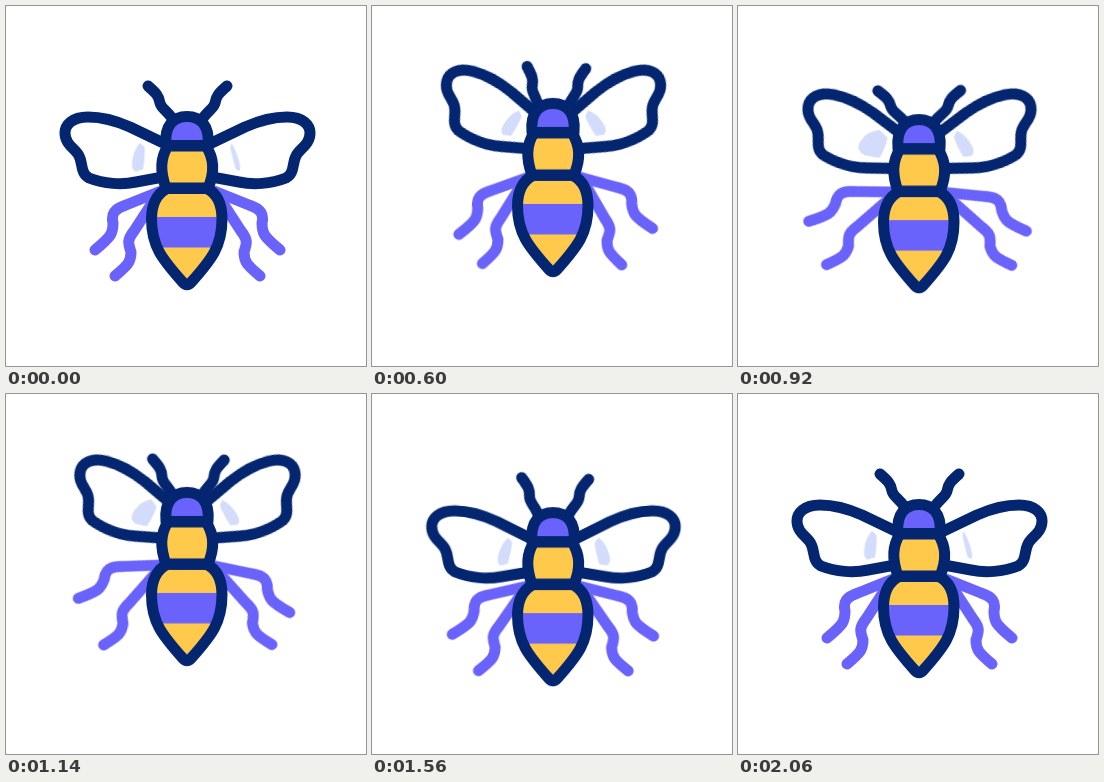
Write an HTML page that moves like this. It is 360 px wide and 360 px high and loops after 2.4 s.

```html
<!DOCTYPE html>
<html lang="en">
<head>
<meta charset="utf-8">
<title>Bee</title>
<style>
  html, body { margin: 0; width: 100%; height: 100%; overflow: hidden; background: #fff; }
  svg { display: block; width: 100vw; height: 100vh; }
  .dark, .leg { fill: none; stroke-width: 11px; stroke-linecap: round; stroke-linejoin: round; }
  .dark { stroke: #04256f; }
  .leg { stroke: #6a63fb; }
  .yellow { fill: #ffca4b; }
  .purple { fill: #6a63fb; }
  .shine { fill: #d3dcfb; }

  .move { animation: 2400ms cubic-bezier(.37, 0, .63, 1) infinite; }
  .bob { animation-name: bob; }
  .wing { animation-name: flap; transform-origin: 215px 168px; }
  .antenna { transform-origin: 166px 112px; }
  .upper { transform-origin: 160px 182px; }
  .lower { transform-origin: 150px 190px; }
  .shine { transform-origin: 135px 151px; }
  .left .antenna { animation-name: antenna-l; }
  .right .antenna { animation-name: antenna-r; }
  .left .upper { animation-name: upper-l; }
  .right .upper { animation-name: upper-r; }
  .left .lower { animation-name: lower-l; }
  .right .lower { animation-name: lower-r; }
  .left .shine { animation-name: shine-l; }
  .right .shine { animation-name: shine-r; }

  @keyframes bob {
    0%, 85.83%, 100% { transform: translateY(0); }
    15.63% { transform: translateY(-20px); }
    41.67% { transform: translateY(4px); }
    51.88% { transform: translateY(-22px); }
    67.5% { transform: translateY(10px); }
  }
  @keyframes flap {
    0%, 85.83%, 100% { transform: rotate(0deg); }
    3.33%, 14.17%, 25%, 37.08%, 47.08%, 57.5%, 68.33% { transform: rotate(15deg); }
    8.96%, 19.58%, 30.83%, 41.88%, 52.29%, 62.92%, 75.83% { transform: rotate(-6deg); }
    80.42% { transform: rotate(10deg); }
  }
  @keyframes antenna-l {
    0%, 85.83%, 100% { transform: rotate(0deg); }
    11.67% { transform: rotate(6.5deg); }
    25%, 57.5% { transform: rotate(21deg); }
    38.33% { transform: rotate(-4deg); }
    73.33% { transform: rotate(3deg); }
  }
  @keyframes antenna-r {
    0%, 73.33%, 85.83%, 100% { transform: rotate(0deg); }
    11.67% { transform: rotate(9.7deg); }
    25% { transform: rotate(12deg); }
    38.33% { transform: rotate(-3deg); }
    57.5% { transform: rotate(13.6deg); }
  }
  @keyframes upper-l {
    0%, 73.33%, 85.83%, 100% { transform: rotate(0deg); }
    11.67% { transform: rotate(20deg); }
    25% { transform: rotate(2deg); }
    38.33% { transform: rotate(22.4deg); }
    57.5% { transform: rotate(16.6deg); }
  }
  @keyframes upper-r {
    0%, 85.83%, 100% { transform: rotate(0deg); }
    11.67% { transform: rotate(7.7deg); }
    25% { transform: rotate(6.5deg); }
    38.33% { transform: rotate(16deg); }
    57.5% { transform: rotate(3.4deg); }
    73.33% { transform: rotate(12.6deg); }
  }
  @keyframes lower-l {
    0%, 57.5%, 85.83%, 100% { transform: rotate(0deg); }
    11.67%, 38.33% { transform: rotate(16deg); }
    25% { transform: rotate(-1deg); }
    73.33% { transform: rotate(4deg); }
  }
  @keyframes lower-r {
    0%, 85.83%, 100% { transform: rotate(0deg); }
    11.67%, 38.33% { transform: rotate(15.4deg); }
    25% { transform: rotate(-3deg); }
    57.5%, 73.33% { transform: rotate(1.6deg); }
  }
  @keyframes shine-l {
    0%, 85.83%, 100% { transform: rotate(4deg) scaleX(1); }
    11.67%, 73.33% { transform: rotate(8deg) scaleX(.85); }
    25%, 57.5% { transform: rotate(14deg) scaleX(1.05); }
    38.33% { transform: rotate(10deg) scaleX(2.1); }
  }
  @keyframes shine-r {
    0%, 85.83%, 100% { transform: rotate(14deg) scaleX(.45); }
    11.67% { transform: rotate(14deg) scaleX(1); }
    25%, 38.33% { transform: rotate(14deg) scaleX(1.1); }
    57.5% { transform: rotate(14deg) scaleX(.8); }
    73.33% { transform: rotate(8deg) scaleX(1.3); }
  }
</style>
</head>
<body>
<svg viewBox="0 0 360 360">
  <defs>
    <path id="upper" d="M160 183L120 199C108 203 105 208 107 217C107 227 106 230 89 244"/>
    <path id="lower" d="M152 188L128 225C121 234 122 237 125 246C125 256 122 259 109 270"/>
    <path id="antenna" d="M166 112C160 104 155 102 154 97C153 90 150 87 142 80"/>
    <path id="shine" d="M133 137L138 141Q139 151 138 163L131 166Q125 164 127 152Q128 143 133 137Z"/>
    <path id="wing" d="M172 144L124 121C106 113 92 111 82 111C66 111 59 119 59 127C59 139 70 143 73 150C77 157 74 167 83 172C98 178 116 179 130 176L168 169"/>
    <path id="abdomen" d="M161 182.500H201C212 188 216 200 216 213C216 240 206 253 185 276.500Q181 281 177 276.500C156 253 145.500 240 145.500 213C145.500 200 150 188 161 182.500Z"/>
    <clipPath id="inside"><use href="#abdomen"/></clipPath>
  </defs>
  <g class="move bob">
    <g class="left">
      <g class="move upper"><use class="leg" href="#upper"/></g>
      <g class="move lower"><use class="leg" href="#lower"/></g>
      <g class="move wing">
        <use class="move shine" href="#shine"/>
        <use class="dark" href="#wing"/>
      </g>
      <g class="move antenna"><use class="dark" href="#antenna"/></g>
    </g>
    <g class="right" transform="translate(363 0) scale(-1 1)">
      <g class="move upper"><use class="leg" href="#upper"/></g>
      <g class="move lower"><use class="leg" href="#lower"/></g>
      <g class="move wing">
        <use class="move shine" href="#shine"/>
        <use class="dark" href="#wing"/>
      </g>
      <g class="move antenna"><use class="dark" href="#antenna"/></g>
    </g>
    <use class="yellow" href="#abdomen"/>
    <rect class="purple" x="140" y="211" width="82" height="30.500" clip-path="url(#inside)"/>
    <path class="yellow" d="M162 140H200C208 152 209 166 202 182H160C154 166 154 152 162 140Z"/>
    <path class="purple" d="M160 139.500C158 119 168 110.500 181 110.500C194 110.500 204 119 202 139.500Z"/>
    <path class="dark" d="M162 140H200C208 152 209 166 202 182H160C154 166 154 152 162 140Z"/>
    <path class="dark" d="M160 139.500C158 119 168 110.500 181 110.500C194 110.500 204 119 202 139.500Z"/>
    <use class="dark" href="#abdomen"/>
  </g>
</svg>
</body>
</html>
```
